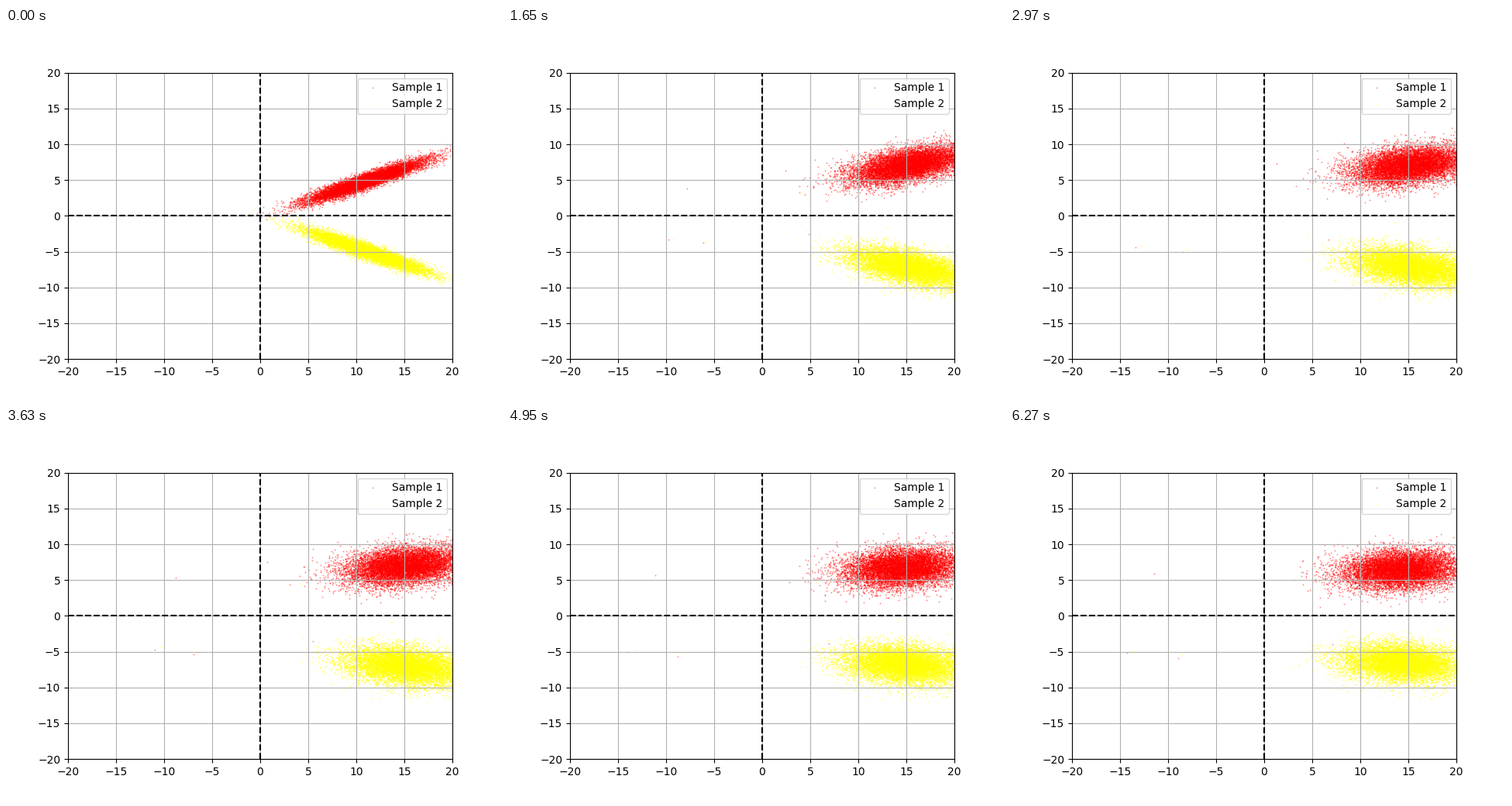
A matplotlib script that plays this animation: 640 px wide and 480 px high, repeating every 6600 ms.

```python
import numpy as np
import matplotlib.pyplot as plt
from matplotlib.animation import FuncAnimation

FRAMES, INTERVAL = 20, 330
COUNT = 10000

# Strays: share of the leftward reach, final height
RED_STRAYS = [(1.0, -5.3), (0.8, 6.0), (0.63, -6.0), (-0.5, -4.0)]
YELLOW_STRAYS = [(0.95, -5.0), (0.6, -5.5), (-0.4, 5.0)]

rng = np.random.default_rng(7)
noise = {side: rng.standard_normal((2, 2, COUNT)) for side in (1, -1)}


def fade(step, rate):
    return np.exp(-step / rate)


def cloud(step, side):
    # Slow mixing of two noise sets keeps the spread while points drift
    turn = 0.05 * step
    first, second = noise[side]
    a, b = np.cos(turn) * first + np.sin(turn) * second

    mean_x = 16.2 - 5.2 * fade(step, 2) - 0.1 * step
    mean_y = 7.7 - 2.8 * fade(step, 2) - 0.063 * step
    slope = 0.03 + 0.42 * fade(step, 7.5)
    spread = 1.36 - 0.82 * fade(step, 3.5)
    dx = 3.1 * a
    return np.column_stack([mean_x + dx,
                            side * (mean_y + slope * dx + spread * b)])


def strays(step, rules):
    wobble = 1.8 * min(step / 10, 1) * np.cos(2 * np.pi * (step - 9) / 5.3)
    reach = 13 * (1 - fade(step + 0.5, 4)) + wobble
    share, height = np.transpose(rules)
    return np.column_stack([-reach * share, height * (1 - fade(step, 5))])


fig, ax = plt.subplots(figsize=(6.4, 4.8), dpi=100)
ax.set(xlim=(-20, 20), ylim=(-20, 20))
ax.set_xticks(range(-20, 21, 5))
ax.set_yticks(range(-20, 21, 5))
ax.grid(True)
# Collections lie below the grid, so it covers part of these lines
ax.hlines(0, -20, 20, colors="black", linestyles="dashed")
ax.vlines(0, -20, 20, colors="black", linestyles="dashed")

samples = [("red", "Sample 1", 1, RED_STRAYS),
           ("yellow", "Sample 2", -1, YELLOW_STRAYS)]
dots = [ax.scatter([], [], s=1.6, color=color, alpha=0.5, linewidths=0,
                   label=label) for color, label, _, _ in samples]
ax.legend(loc="upper right")


def update(step):
    for dot, (_, _, side, rules) in zip(dots, samples):
        dot.set_offsets(np.vstack([cloud(step, side), strays(step, rules)]))
    return dots


anim = FuncAnimation(fig, update, frames=FRAMES, interval=INTERVAL,
                     init_func=lambda: update(0), repeat=True, repeat_delay=0)
plt.show()
```
